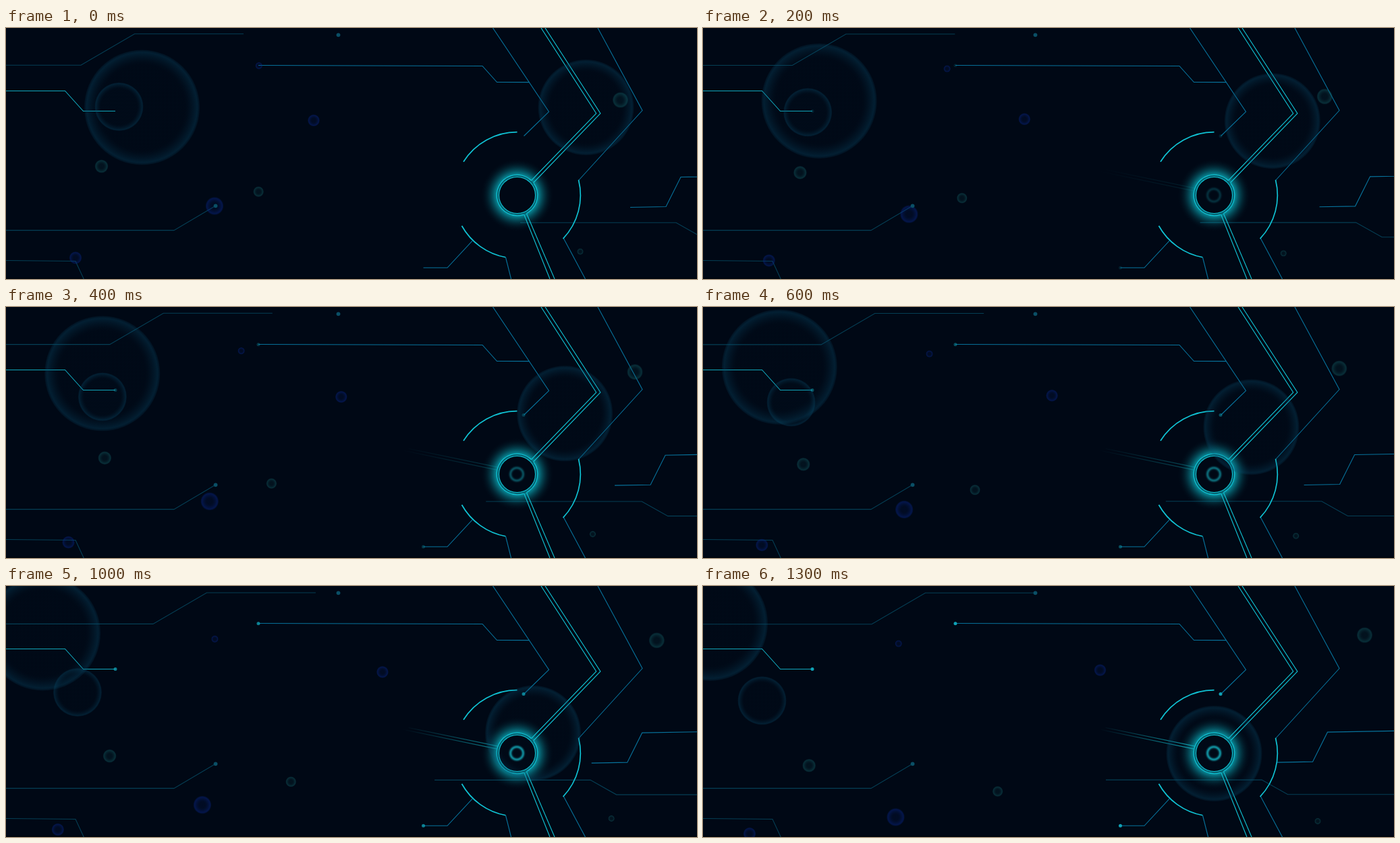
Animation of 1024 by 373 pixels, one loop 1400 ms. Source, as an HTML page with a canvas:

```html
<!DOCTYPE html>
<html lang="en">
<head>
<meta charset="utf-8">
<title>Circuit banner</title>
<style>
  html, body { margin: 0; width: 100%; height: 100%; overflow: hidden; background: #000815; }
  canvas { display: block; width: 100%; height: 100%; }
</style>
</head>
<body>
<canvas id="stage" width="1024" height="373"></canvas>
<script>
const ctx = document.getElementById('stage').getContext('2d');
const W = 1024, H = 373, LOOP = 1400, STEP = 100;
const LAST = LOOP / STEP - 1;
const HUB = { x: 757.5, y: 248.5, ring: 30.3, core: 27, orbit: 93.8 };
const BG = '#000815', DIM = '#053f55', BLUE = '#07729b', TEAL = '#11a6ba', BRIGHT = '#10c3d4';
const SEA = '8,78,110', MINT = '18,92,98', INK = '8,38,140';

const mix = (a, b, p) => a + (b - a) * p;

function line(pts, color, width = 1.1) {
  ctx.beginPath();
  for (const [x, y] of pts) ctx.lineTo(x, y);
  ctx.strokeStyle = color;
  ctx.lineWidth = width;
  ctx.stroke();
}

// Level run, diagonal, level tail; tilt is the slope of the level parts.
function bend(color, x, y, run, dx, dy, tail = 0, tilt = 0) {
  const x1 = x + run, y1 = y + run * tilt, x2 = x1 + dx, y2 = y1 + dy;
  line([[x, y], [x1, y1], [x2, y2], [x2 + tail, y2 + tail * tilt]], color);
}

// Two lines on either side of a path, with the gap changing along it.
function pair(pts, color, from, to) {
  for (const side of [-1, 1]) {
    line(pts.map(([x, y], i) => [x + side * mix(from, to, i / (pts.length - 1)), y]), color);
  }
}

function disc(x, y, r, fill) {
  ctx.beginPath();
  ctx.arc(x, y, r, 0, Math.PI * 2);
  ctx.fillStyle = fill;
  ctx.fill();
}

function arc(r, from, to, width) {
  const rad = Math.PI / 180;
  ctx.beginPath();
  ctx.arc(HUB.x, HUB.y, r, from * rad, to * rad);
  ctx.strokeStyle = BRIGHT;
  ctx.lineWidth = width;
  ctx.stroke();
}

// Radial fill whose alpha follows a function of the relative radius.
function halo(x, y, r, rgb, alpha) {
  const g = ctx.createRadialGradient(x, y, 0, x, y, r), n = 24;
  for (let i = 0; i <= n; i++) g.addColorStop(i / n, `rgba(${rgb},${alpha(i / n)})`);
  disc(x, y, r, g);
}

function bubble(rgb, r, x, y, dx, dy, p) {
  const big = r > 30, inner = big ? .74 : .3, peak = big ? .97 : .86;
  const base = big ? .02 : .12, rim = big ? .36 : .46;
  halo(x + dx * p, y + dy * p, r, rgb, q => {
    if (q > peak) return rim * mix(1, .35, (q - peak) / (1 - peak));
    return mix(base, rim, Math.max(0, (q - inner) / (peak - inner)) ** 1.5);
  });
}

function drawWires(p) {
  bend(TEAL, 0, 93.5, 87.5, 27, 30, 47.5);
  bend(BLUE, 374, 55.5, 332, 21.5, 24, 48, .003);
  bend(BLUE, 618.5, 356.3, 35.5, 37, -40);
  bend(DIM, 0, 300.6, 249, 61.5, -36.3);
  bend(DIM, 0, 345.5, 103, 12.5, 27, 0, .01);

  bend(DIM, 139 * p - 140, 55.2 + 1.5 * p, 251, 79.5, -46.4, 161.5);
  bend(BLUE, 925 - 74.5 * p, 266.5 - 4.4 * p, 53, 22, -44, 110, -.018);
  bend(DIM, 762 - 165 * p, 289.3 - 1.2 * p, 231, 38.5, 21.7, 170);

  line([[721.5, 0], [804.5, 124.5], [767.5, 160.5]], BLUE);
  line([[877, 0], [943, 122.5], [848.5, 226.5]], BLUE);
  line([[826.5, 313], [858.5, H]], BLUE);
  line([[740.5, 341], [748.5, H]], BLUE);
}

function drawBeams(p) {
  const g = ctx.createLinearGradient(588, 0, 728, 0);
  g.addColorStop(0, 'rgba(16,170,185,0)');
  g.addColorStop(1, 'rgba(16,170,185,.95)');
  ctx.globalAlpha = p;
  pair([[586, 210.5], [750, 244.6]], g, 10.6, 10.6);
  ctx.globalAlpha = 1;
}

function drawHub(p) {
  const edge = 54, start = HUB.ring / edge;
  halo(HUB.x, HUB.y, edge, '12,190,205',
    q => .72 * (1 - Math.max(0, (q - start) / (1 - start))) ** 2);

  drawBeams(p);
  pair([[796, 0], [877.8, 127], [761, 248]], BRIGHT, 3, 3.2);
  pair([[764, 263], [809.5, H]], BRIGHT, 2, 3.5);

  disc(HUB.x, HUB.y, HUB.ring, '#05606e');
  disc(HUB.x, HUB.y, HUB.core, BG);
  arc(HUB.core, 0, 360, 1.1);
  arc(HUB.ring, -36, 62, 1.2);
  arc(HUB.ring, 72, 314, 1.2);
  for (const [from, to] of [[212, 270], [-14, 43.5], [100.5, 151]]) {
    arc(HUB.orbit, from, to, 1.7);
  }
}

function drawBubbles(p) {
  bubble(SEA, 85.5, 201.5, 118, -191, -62.5, p);
  bubble(SEA, 36, 167.5, 117, -80, 53.3, p);
  bubble(SEA, 71, 859.5, 118, -102, 131, p);

  bubble(MINT, 11.5, 910.5, 107, 70, -34, p);
  bubble(MINT, 9.8, 141.5, 205.5, 15.7, 61.2, p);
  bubble(MINT, 7.7, 374.2, 243.2, 62.5, 62, p);
  bubble(MINT, 4.7, 851, 332.2, 60, 17.3, p);

  bubble(INK, 8.8, 456, 137.3, 132.5, -12.3, p);
  bubble(INK, 5.2, 374.8, 56, -85, 29.6, p);
  bubble(INK, 13.2, 309, 264.5, -23.5, 79, p);
  bubble(INK, 9.2, 103, 341.5, -34, 26.5, p);
}

function drawLights(p) {
  for (const [x, y] of [[492.5, 10.3], [310.6, 264.3]]) disc(x, y, 2.9, '#0a4f66');

  ctx.globalAlpha = p;
  for (const [x, y] of [[162, 123.5], [374, 55.7], [767, 160.6], [618.5, 356.2]]) {
    disc(x, y, 2.5, '#0fa2b6');
  }
  ctx.globalAlpha = 1 - (1 - p) ** 2;
  halo(757, 248.5, 13, '18,160,175', q => Math.exp(-(((q - .72) / .16) ** 2)) * .9);
  ctx.globalAlpha = 1;
}

function draw(p) {
  ctx.fillStyle = BG;
  ctx.fillRect(0, 0, W, H);
  ctx.fillStyle = '#00050d';
  ctx.fillRect(0, H - 2, W, 2);
  drawWires(p);
  drawHub(p);
  drawBubbles(p);
  drawLights(p);
}

const start = performance.now();
function tick() {
  const t = (performance.now() - start) % LOOP;
  draw(Math.floor(t / STEP) / LAST);
  requestAnimationFrame(tick);
}
tick();
</script>
</body>
</html>
```
